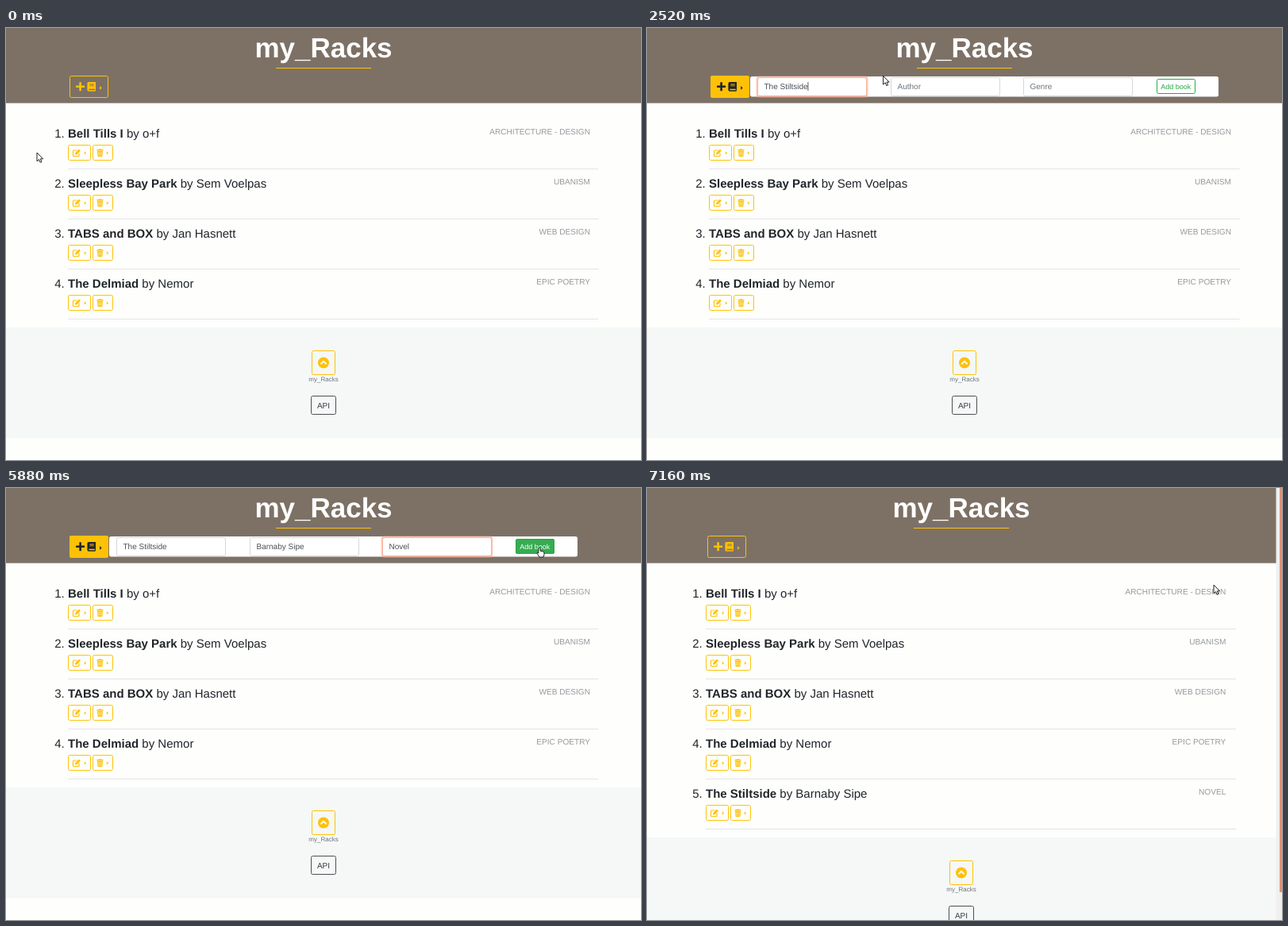
Recreate the animation shown at these times as an HTML page. Size 800 by 544 pixels, loop 7200 ms.

```html
<!DOCTYPE html>
<html lang="en">
<head>
<meta charset="utf-8">
<title>Book list</title>
<style>
  html, body { margin: 0; width: 100%; height: 100%; overflow: hidden; background: #fefffd; }
  svg { display: block; font: 10px "Liberation Sans", Arial, sans-serif; text-rendering: geometricPrecision; }
  text { white-space: pre; }
</style>
</head>
<body>
<svg id="stage" width="800" height="544" viewBox="0 0 800 544"></svg>
<script>
const LOOP = 7200, TICK = 40, ROW = 63;
const GOLD = '#ffc107', DARK = '#212529', GREEN = '#28a745', PAPER = '#fefffd', BAND = '#f6f8f7';
const OPEN = 400, RELOAD = 6120, CLOSE = 6970, CLOSED = 7160;

const books = [
  ['Bell Tills I', 'o+f', 'ARCHITECTURE - DESIGN'],
  ['Sleepless Bay Park', 'Sem Voelpas', 'UBANISM'],
  ['TABS and BOX', 'Jan Hasnett', 'WEB DESIGN'],
  ['The Delmiad', 'Nemor', 'EPIC POETRY'],
  ['The Stiltside', 'Barnaby Sipe', 'NOVEL']
];

// Each burst is [time of first key, number of keys, gap between keys].
const fields = [
  { x: 139.5, hint: 'Title', text: books[4][0], focus: 580, blur: 2620,
    bursts: [[1000, 4, 80], [1400, 4, 80], [1800, 1, 80], [1960, 4, 80]] },
  { x: 307.5, hint: 'Author', text: books[4][1], focus: 2620, blur: 4580,
    bursts: [[3000, 3, 120], [3400, 5, 80], [3880, 4, 80]] },
  { x: 474.5, hint: 'Genre', text: 'Novel', focus: 4580, blur: 1e5,
    bursts: [[5000, 5, 80]] }
];
for (const f of fields)
  f.keys = f.bursts.flatMap(([start, n, gap]) => Array.from({ length: n }, (_, i) => start + i * gap));

const mousePath = [
  [0, 39, 157], [280, 104, 76], [400, 106, 76], [600, 190, 65], [960, 190, 65], [1160, 191, 63],
  [2400, 191, 63], [2480, 260, 58], [2600, 405, 67], [2960, 405, 67], [3160, 406, 66],
  [4320, 406, 66], [4420, 445, 86], [4520, 489, 76], [5280, 489, 76], [5360, 609, 70],
  [5520, 609, 70], [5800, 672, 75], [5960, 672, 75], [6080, 670.5, 79],
  [6440, 670.5, 79], [6600, 742, 140], [6680, 714, 122], [LOOP, 714, 122]
];

const clamp = v => Math.max(0, Math.min(1, v));
const fade = (t, start) => clamp((t - start) / 150);

function mouseAt(t) {
  const i = mousePath.findIndex(k => k[0] > t);
  const [t0, x0, y0] = mousePath[i - 1], [t1, x1, y1] = mousePath[i];
  const u = (t - t0) / (t1 - t0), e = u * u * (3 - 2 * u);
  return [x0 + (x1 - x0) * e, y0 + (y1 - y0) * e];
}

const measure = document.createElement('canvas').getContext('2d');
measure.font = '10px "Liberation Sans", Arial, sans-serif';

const at = (x, y, body) => `<g transform="translate(${x} ${y})">${body}</g>`;
const path = (d, fill, more = '') => `<path d="${d}" fill="${fill}" ${more}/>`;
const rect = (x, y, w, h, fill, more = '') =>
  `<rect x="${x}" y="${y}" width="${w}" height="${h}" fill="${fill}" ${more}/>`;
const outline = (x, y, w, h, color, fill = 'none') =>
  rect(x, y, w, h, fill, `rx="2" stroke="${color}"`);
const label = (x, y, s, fill, more = '') => `<text x="${x}" y="${y}" fill="${fill}" ${more}>${s}</text>`;
const MIDDLE = 'text-anchor="middle"', END = 'text-anchor="end"', BOLD = 'font-weight="bold"';

const plusBook = color =>
  path('M92.3 68.3h2.6v4.2h4.2v2.6h-4.2v4.2h-2.6v-4.2h-4.2v-2.6h4.2z', color) +
  path('M104.3 68H113v9.2l-.4 2.6h-8.4q-1.8 0-1.8-1.8v-8.2q0-1.8 1.9-1.8z' +
       'M105.3 70.6v.8h5.4v-.8zM105.3 72.4v.8h5.4v-.8zM104.4 76.7v1.5h7.4v-1.5z', color, 'fill-rule="evenodd"') +
  path('M118.2 73l2.4 2.5-2.4 2.5z', color);

const editButton = outline(78.5, 147.5, 28, 19, GOLD) +
  path('M89.5 154h-4q-1 0-1 1v5.5q0 1 1 1h5.5q1 0 1-1v-3', 'none', `stroke="${GOLD}" stroke-width="1.2"`) +
  path('M87 159.6l.3-2.4 4.6-4.6 2 2-4.6 4.6z', GOLD) + path('M98.9 155.2l2.1 2.2-2.1 2.2z', GOLD);
const trashButton = outline(109.5, 147.5, 25, 19, GOLD) +
  path('M114.4 153h2.3l.5-.7h2.6l.5.7h2.3v1.2h-8.2z' +
       'M115 154.8h7l-.5 6.4q0 .8-.9.8h-4.2q-.9 0-.9-.8z' +
       'M116.5 156v4.8h.6V156zM118.2 156v4.8h.6V156zM119.9 156v4.8h.6V156z', GOLD, 'fill-rule="evenodd"') +
  path('M126.9 155.2l2.1 2.2-2.1 2.2z', GOLD);

const bookRow = ([title, author, genre], i, genreX) => at(0, i * ROW,
  label(73.8, 138.2, `${i + 1}.`, DARK, `font-size="15" ${END}`) +
  label(78, 138.2, `<tspan ${BOLD}>${title}</tspan> by ${author}`, DARK, 'font-size="15"') +
  label(genreX, 133.8, genre, '#95999c', `font-size="10.1" ${END}`) +
  editButton + trashButton + rect(78, 177, 668.5, 1, '#e4e5e3'));

const footer = rect(-10, 377, 820, 139.5, BAND) +
  outline(385.5, 406.5, 29, 30, GOLD) +
  `<circle cx="400" cy="421.5" r="7" fill="${GOLD}"/>` +
  path('M396.3 423.3l3.7-3.6 3.7 3.6', 'none', `stroke="${BAND}" stroke-width="1.9"`) +
  label(400, 445, 'my_Racks', '#6c757d', `font-size="8" ${MIDDLE}`) +
  outline(384.5, 463.5, 31, 23, '#4a5055') +
  label(400, 479, 'API', '#343a40', MIDDLE);

function inputField(f, t) {
  const glow = fade(t, f.focus) * (1 - fade(t, f.blur));
  const typed = f.keys.filter(k => k <= t).length, text = f.text.slice(0, typed);
  const x = f.x + 8;
  let out = outline(f.x, 62.5, 137, 23, '#d3d8dd', '#fff');
  if (glow) out += `<g opacity="${glow}">` +
    rect(f.x - 1, 61.5, 139, 25, 'none', 'rx="3" stroke="#ffab91" stroke-opacity=".6" stroke-width="2"') +
    outline(f.x, 62.5, 137, 23, '#f5b39f') + '</g>';
  out += text ? label(x, 77, text, '#495057') : label(x, 77, f.hint, '#6c757d');
  const lastEvent = typed ? f.keys[typed - 1] : f.focus;
  if (t >= f.focus && t < f.blur && (t - lastEvent) % 1000 < 500)
    out += rect(x + measure.measureText(text).width, 68, .8, 11, '#333');
  return out;
}

function form(t) {
  const hover = fade(t, 5740);
  return rect(130, 61, 590, 25.5, '#fff', 'rx="2.5"') + fields.map(f => inputField(f, t)).join('') +
    outline(642.5, 64.5, 48, 18, GREEN) + rect(642, 64, 49, 19, GREEN, `rx="2.2" opacity="${hover}"`) +
    label(666.3, 76.8, 'Add book', hover > .5 ? '#fff' : GREEN, `font-size="9" ${MIDDLE}`);
}

const alertBox = opacity => `<g opacity="${opacity}">` +
  rect(58.5, 109.5, 675, 31, '#fcf2cc', 'rx="2.2" stroke="#fdeec0" stroke-width=".8"') +
  label(382.7, 129, 'New book added', '#856404', MIDDLE) +
  label(716, 130.4, '×', '#b9a566', `font-size="15" ${BOLD} ${MIDDLE}`) + '</g>';

const pointers = {
  arrow: path('M0 0V10.8L2.6 8.5 4.2 12.3 6 11.5 4.4 7.8H7.6Z', '#fff', 'stroke="#222" stroke-linejoin="round"'),
  hand: path('M-1.1 1Q-1 0 0 0T1.1 1V4.2L4.5 5Q6 5.4 6 6.8V9L5 12H0L-2.8 7.6Q-3.2 6.2-2 6.2L-1.1 7.2Z',
             '#fff', 'stroke="#222" stroke-linejoin="round"'),
  beam: ['#fff', '#222'].map((c, i) =>
    path('M-2.4-4.8H2.4M0-4.8V4.8M-2.4 4.8H2.4', 'none', `stroke="${c}" stroke-width="${i ? 1.6 : 3}"`)).join('')
};

function pointer(t) {
  const [x, y] = mouseAt(t);
  const over = (l, top, r, b) => x >= l && x <= r && y >= top && y <= b;
  let kind = 'arrow';
  if (t < RELOAD) {
    if (over(80, 61, 129, 87) || t >= OPEN && over(642, 64, 691, 83)) kind = 'hand';
    else if (t >= OPEN && fields.some(f => over(f.x, 62, f.x + 138, 87))) kind = 'beam';
  } else if (t < CLOSED && over(704, 112, 728, 138)) kind = 'hand';
  return at(x, y, pointers[kind]);
}

function scene(t) {
  const added = t >= RELOAD, alerting = added && t < CLOSED;
  const rows = added ? books : books.slice(0, 4);
  const lit = added ? 0 : fade(t, 220);
  const drop = alerting ? 41 : 0;
  const list = rows.map((b, i) => bookRow(b, i, added ? 733.3 : 736)).join('');
  const page = rect(-10, 0, 820, 94.6, '#7d7166') +
    label(400, 37, 'my_Racks', '#fff', `font-size="35" ${BOLD} ${MIDDLE}`) +
    rect(340, 50, 120, 1, GOLD) +
    outline(80.5, 60.5, 48, 27, GOLD) + rect(80, 60, 49, 28, GOLD, `rx="2.4" opacity="${lit}"`) +
    plusBook(lit > .5 ? DARK : GOLD) +
    (t >= OPEN && !added ? form(t) : '') +
    at(0, drop, list + at(0, (rows.length - 4) * ROW, footer));
  const scrollbar = rect(792.5, 0, 7.5, 544, '#f0efee') + rect(797, 0, 3, alerting ? 473 : 509, '#e5926f');
  return rect(0, 0, 800, 544, PAPER) + at(added ? -4 : 0, 0, page) +
    (alerting ? alertBox(1 - fade(t, CLOSE)) : '') + (added ? scrollbar : '') + pointer(t);
}

const stage = document.getElementById('stage');
let shown = -1;
function draw() {
  const t = Math.floor(performance.now() % LOOP / TICK) * TICK;
  if (t !== shown) stage.innerHTML = scene(shown = t);
  requestAnimationFrame(draw);
}
draw();
</script>
</body>
</html>
```
